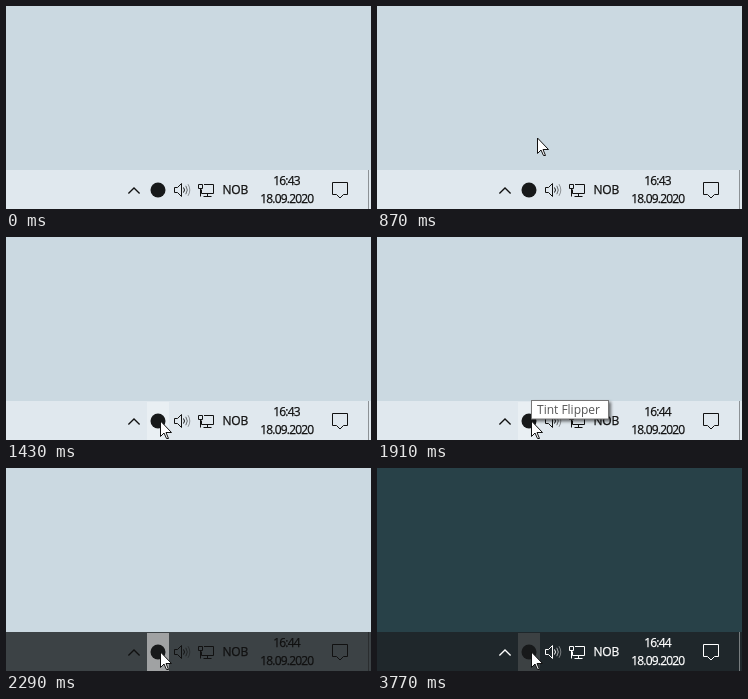
An HTML page for the animation above (4.78 s loop, 365 by 203 pixels).

```html
<!DOCTYPE html>
<html lang="en">
<head>
<meta charset="utf-8">
<title>Taskbar theme toggle</title>
<style>
  html, body { margin: 0; width: 100%; height: 100%; overflow: hidden; }
  body { position: relative; background: #cbd9e1; animation: desktop 4.78s step-end infinite; }
  svg { position: absolute; display: block; overflow: visible; }
  .scene { left: 0; top: 0; width: 365px; height: 203px; }
  text { font: 12px "Open Sans", "Noto Sans", sans-serif; fill: currentColor; }
  .ink text { stroke: currentColor; stroke-width: .25px; letter-spacing: -.2px; }
  .ink .clock text { letter-spacing: -.8px; text-anchor: middle; }
  .icons { fill: none; stroke: currentColor; }
  .bar, .hover, .ink, .tip, .before, .after { animation: 4.78s step-end infinite; }
  .bar { animation-name: bar; }
  .hover { animation-name: hover; }
  .ink { animation-name: ink; }
  .tip { animation-name: tip; color: #575757; }
  .tip rect { filter: drop-shadow(2px 2px 1.5px #0008); }
  .before { animation-name: before; }
  .after { animation-name: after; }
  .cursor { left: 156px; top: -30px; width: 13px; height: 20px; animation: move 4.78s infinite; }

  @keyframes desktop {
    0% { background: #cbd9e1; }
    78.8%, 100% { background: #284148; }
  }
  @keyframes bar {
    0% { fill: #e0e8ee; }
    46.4% { fill: #8f979b; }
    47.85% { fill: #3c4245; }
    78.8%, 100% { fill: #1f272b; }
  }
  @keyframes hover {
    0% { fill: transparent; }
    24.79% { fill: #e9eff3; }
    46.4% { fill: #c4c8ca; }
    47.85% { fill: #a0a2a3; }
    53.1% { fill: #898c8d; }
    53.9% { fill: #727577; }
    54.75% { fill: #5b5f61; }
    78.8%, 100% { fill: #3c4143; }
  }
  @keyframes ink {
    0% { color: #111; }
    53.1% { color: #666; }
    53.9% { color: #b0b0b0; }
    54.75%, 100% { color: #fff; }
  }
  @keyframes tip {
    0% { opacity: 0; }
    34.7% { opacity: .25; }
    36.4% { opacity: .5; }
    38.2% { opacity: .75; }
    39.9% { opacity: 1; }
    46.4%, 100% { opacity: 0; }
  }
  @keyframes before {
    0% { opacity: 1; }
    36.4%, 100% { opacity: 0; }
  }
  @keyframes after {
    0% { opacity: 0; }
    36.4%, 100% { opacity: 1; }
  }
  /* The pointer advances in discrete samples along each leg. */
  @keyframes move {
    0% { left: 156px; top: -30px; animation-timing-function: step-end; }
    3.243% { left: 156px; top: 3px; animation-timing-function: steps(7); }
    14.749% { left: 159px; top: 101px; animation-timing-function: steps(3); }
    19.874% { left: 160px; top: 146px; animation-timing-function: steps(3); }
    24.791% { left: 159px; top: 171px; animation-timing-function: steps(3); }
    29.812%, 100% { left: 154px; top: 183px; }
  }
</style>
</head>
<body>
<svg class="scene" viewBox="0 0 365 203">
  <rect class="bar" y="164" width="365" height="39"/>
  <rect class="hover" x="141" y="165" width="22" height="38"/>
  <circle cx="152" cy="184" r="7.5" fill="#17191a"/>

  <g class="ink">
    <g class="icons">
      <path d="M122.4 187.5 128 182l5.6 5.5" stroke-width="1.3"/>
      <path d="M168.5 181.5h3l4-4v13l-4-4h-3z"/>
      <path d="M177.5 181.5q2 2.5 0 5"/>
      <path d="M179.8 179.8q3 4.2 0 8.4" opacity=".6"/>
      <path d="M182 178.2q3.6 5.8 0 11.6" opacity=".4"/>
      <path d="M198 178.5h9.5v9h-12v-4M201.5 187.5v3M197.5 190.5h8M192.5 178.5h4v4h-4zM194.5 182.5v8"/>
      <path d="M326.5 176.5h15v12h-4l-3.5 3.5-3.5-3.5h-4z"/>
      <path d="M362.5 164v39" opacity=".4"/>
    </g>
    <text x="216.5" y="188">NOB</text>
    <g class="clock">
      <text class="before" x="280.5" y="179">16:43</text>
      <text class="after" x="280.5" y="179">16:44</text>
      <text x="280.8" y="197">18.09.2020</text>
    </g>
  </g>

  <g class="tip">
    <rect x="154.5" y="163.5" width="77" height="18.5" fill="#fff" stroke="#767676"/>
    <text x="160" y="177">Tint Flipper</text>
  </g>
</svg>

<svg class="cursor" viewBox="0 0 13 20">
  <path d="M.5 1v15.5l3.5-3.5 2.5 5.5h2l-2.5-6h5.5z" fill="#fff" stroke="#111"/>
</svg>
</body>
</html>
```
